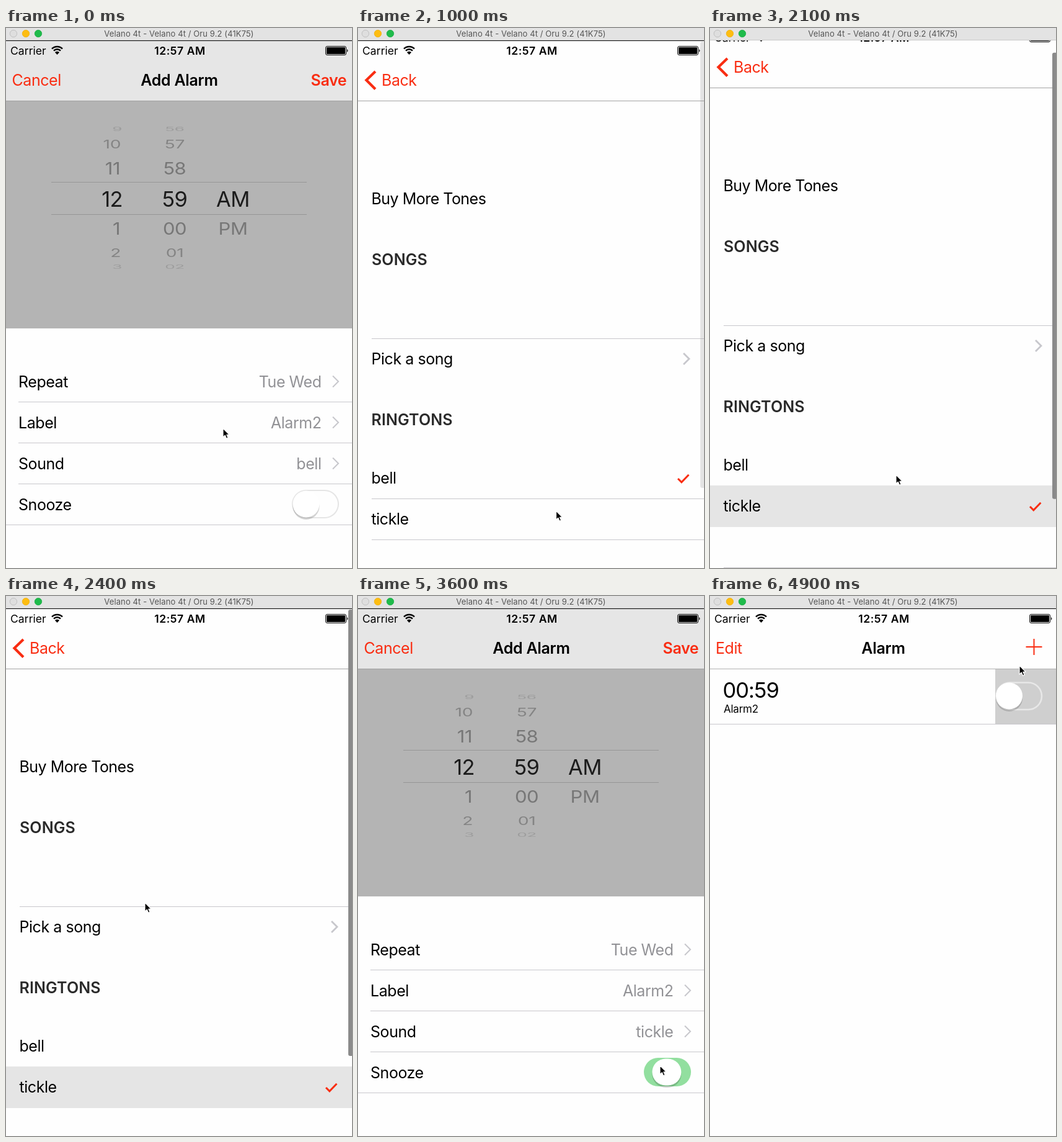
An HTML page that plays this animation: 558 by 870 pixels, repeating every 5 s.

```html
<!DOCTYPE html>
<html lang="en">
<head>
<meta charset="utf-8">
<title>Alarm settings</title>
<style>
  html, body { margin: 0; width: 100%; height: 100%; overflow: hidden; background: #fefefe; }
  svg { display: block; width: 100vw; height: 100vh; }
  text { font-family: Inter, Roboto, "Liberation Sans", sans-serif; white-space: pre; }
</style>
</head>
<body>
<svg id="stage" viewBox="0 0 558 870" xmlns="http://www.w3.org/2000/svg"></svg>
<script>
const RED = '#f92d12', GREY = '#929296', LINE = '#c8c7cc', LOOP = 5000, STEP = 100;

// ---- drawing helpers ----
const label = (x, y, str, o = {}) => {
  const { size = 25, weight = 400, fill = '#000', anchor = 'start', gap = -0.45, id = '' } = o;
  return `<text id="${id}" x="${x}" y="${y}" font-size="${size}" font-weight="${weight}" ` +
    `fill="${fill}" text-anchor="${anchor}" letter-spacing="${gap}">${str}</text>`;
};
const box = (x, y, w, h, fill, extra = '') =>
  `<rect x="${x}" y="${y}" width="${w}" height="${h}" fill="${fill}" ${extra}/>`;
const rule = (y, x = 0, w = 558, fill = LINE) => box(x, y, w, 1, fill);
const stroke = (d, color, width, extra = '') =>
  `<path d="${d}" fill="none" stroke="${color}" stroke-width="${width}" ${extra}/>`;
const group = (id, inner, extra = '') => `<g id="${id}" ${extra}>${inner}</g>`;
const arrow = (x, y, width) => stroke(`M${x} ${y - 9}l9 9l-9 9`, '#c7c7cc', width);
const middle = { weight: 600, anchor: 'middle', gap: -.3 };
const heading = { weight: 600, fill: '#2a2a2a', gap: .1 };

// ---- time picker: y centre, x scale, y scale, colour, hour, hour edge, minute, half ----
const dial = [
  [163, .76, .25, '#9d9d9d', '9', 187, '56', ''],
  [187, .82, .56, '#848484', '10', 185, '57', ''],
  [226, .90, .80, '#777', '11', 184, '58', ''],
  [275, 1, 1, '#1c1c1c', '12', 188, '59', 'AM'],
  [323, .90, .80, '#777', '1', 184, '00', 'PM'],
  [362, .82, .56, '#848484', '2', 185, '01', ''],
  [385, .76, .25, '#9d9d9d', '3', 187, '02', '']
];
const dialText = ([y, sx, sy, fill, hour, edge, minute, half]) => {
  const put = (x, str, anchor) => str &&
    `<g transform="translate(${x} ${y}) scale(${sx} ${sy})">` +
    label(0, 12.6, str, { size: 34.5, fill, anchor, gap: -.6 }) + '</g>';
  return put(edge, hour, 'end') + put(272, minute, 'middle') + put(366, half, 'middle');
};
const picker = box(-60, 118, 618, 366, '#b4b4b4') + rule(248, 73, 412, '#969696') +
  rule(300, 73, 412, '#969696') + dial.map(dialText).join('');

const row = (i, name, value, id) => {
  const y = 579 + 66 * i;
  return label(20, y, name) + (value ? label(508.5, y, value, { fill: GREY, anchor: 'end', id }) +
    arrow(527, y - 9.5, 2) + rule(y + 23, 20, 538) : rule(y + 23));
};

const knob = (id, x, y, r) => group(id,
  `<rect x="${x - r}" y="${y - r + 3.5}" width="${2 * r}" height="${2 * r}" rx="${r}" fill="#000" opacity=".17"/>` +
  `<rect x="${x - r}" y="${y - r}" width="${2 * r}" height="${2 * r}" rx="${r}" fill="#fff"/>`);

const snooze = box(461, 744, 76, 46, '#e5e5e5', 'rx="23" id="track"') +
  box(463, 746, 72, 42, '#fefefe', 'rx="21" id="hollow"') + knob('knob', 484, 767, 21.5);

const addPage = group('addPage', box(-60, 118, 618, 800, '#fefefe') + picker +
  row(0, 'Repeat', 'Tue Wed') + row(1, 'Label', 'Alarm2') + row(2, 'Sound', 'bell', 'tone') +
  row(3, 'Snooze') + snooze);

const soundPage = group('soundPage',
  box(-9, 118, 9, 800, 'url(#edge)') + box(0, 118, 558, 800, '#fefefe') +
  label(21.5, 284, 'Buy More Tones', { gap: -.52 }) +
  label(22, 382, 'SONGS', heading) + rule(500, 22, 536) +
  label(21.5, 542, 'Pick a song') + arrow(525, 533, 2.8) +
  label(21.5, 640, 'RINGTONS', heading) +
  rule(758, 22, 536) + rule(824, 22, 536) + rule(890, 22, 536) +
  box(0, 758, 558, 67, '#e5e5e5', 'id="picked"') +
  label(21.5, 734, 'bell') + label(21.5, 800, 'tickle') +
  stroke('M516 726l5.8 5.8l11.6-12', RED, 3, 'id="check"'));

const addNav = box(0, 21, 558, 97, '#e6e6e6') +
  group('white', box(-28, 21, 37, 97, 'url(#haze)') + box(8, 21, 640, 97, '#fefefe')) +
  group('addItems', label(9.5, 93, 'Cancel', { fill: RED }) +
    group('addTitle', label(279.5, 93, 'Add Alarm', middle)) +
    label(549, 93, 'Save', { weight: 600, fill: RED, anchor: 'end' })) +
  group('backItems', stroke('M28 70L13.5 84L28 98.5', RED, 4.2) + label(38, 93, 'Back', { fill: RED })) +
  rule(117, 0, 558, '#a3a3a3');

const listPage = box(0, 21, 558, 900, '#fefefe') +
  label(9, 93, 'Edit', { fill: RED }) + label(279.5, 93, 'Alarm', middle) +
  stroke('M509.5 82h26M522.5 69v26', RED, 2) + rule(117, 0, 558, '#b2b2b2') +
  label(20.5, 164, '00:59', { size: 34.5, gap: -1 }) +
  label(22, 188, 'Alarm2', { size: 17, gap: -.25 }) + rule(206) +
  box(460, 118, 98, 88, '#cfcfcf') +
  box(462, 139.5, 73, 43.5, 'none', 'rx="21.7" stroke="#e8e8e8" stroke-width="2.5"') +
  knob('', 482.5, 161, 21.5);

const arc = r => {
  const d = r * .72;
  return stroke(`M${82.5 - d} ${42 - d}A${r} ${r} 0 0 1 ${82.5 + d} ${42 - d}`, '#000', 2.5);
};
const status = rule(20, 0, 558, '#111') + label(7, 43, 'Carrier', { size: 17.6, gap: 0 }) +
  '<path d="M82.5 43l-3.5-3.8a5 5 0 0 1 7 0z"/>' + arc(7.6) + arc(11.8) +
  label(280.5, 43, '12:57 AM', { size: 17.6, weight: 600, anchor: 'middle', gap: .5 }) +
  box(515.5, 29.5, 33, 14, 'none', 'rx="2.5" stroke="#000"') + box(517, 31, 30, 11, '#000', 'rx="1"') +
  '<path d="M550 34a3 3 0 0 1 0 5z"/>';

const dot = (x, fill, edge) => `<circle cx="${x}" cy="9" r="5.7" fill="${fill}" stroke="${edge}" stroke-width=".8"/>`;
const titleBar = box(0, 0, 558, 20, '#e3e3e3') + rule(19, 0, 558, '#c9c9c9') +
  dot(12, '#dedede', '#b9b9b9') + dot(32, '#fdbd12', '#f0b00c') + dot(52, '#1fbb4b', '#18ac42') +
  label(279, 14, 'Velano 4t - Velano 4t / Oru 9.2 (41K75)',
    { size: 13, fill: '#555', anchor: 'middle', gap: .1 });

const fade = (id, color) => `<linearGradient id="${id}"><stop offset="0" stop-color="${color}" stop-opacity="0"/>` +
  `<stop offset="1" stop-color="${color}"/></linearGradient>`;

document.getElementById('stage').innerHTML =
  `<defs>${fade('edge', '#e6e6e6')}${fade('haze', '#fefefe')}</defs>` +
  box(0, 0, 558, 870, '#fefefe') +
  group('screen', listPage + group('modal', addPage + soundPage + addNav) + status) +
  box(552, 22, 8, 719, '#8a8a8a', 'rx="3" id="bar"') + titleBar +
  group('cursor', '<path d="M0 0V14.2L3.3 11.2L5.6 16.4L8.1 15.3L5.9 10.3H10.2Z" ' +
    'stroke="#fff" stroke-width="1.2" stroke-linejoin="round"/>');

// ---- motion ----
const cursorPath = [
  [0, 350, 645], [100, 349, 652], [200, 343, 690], [300, 340, 702], [400, 340, 702],
  [800, 322, 770], [1000, 319.5, 778], [1800, 318, 778], [1900, 318, 778], [2100, 300, 720],
  [2400, 224, 494], [2500, 130, 240], [2600, 68, 98], [2900, 66, 99], [3000, 75, 112],
  [3300, 360, 600], [3500, 486, 756], [3700, 488, 757], [3900, 500, 560], [4100, 513, 170],
  [4200, 514, 92], [4800, 514, 92], [4900, 499, 112]
];
const scrollPath = [[1000, 0], [1200, 18], [1300, 25], [2000, 25], [2100, 21], [2200, 8], [2300, 0]];
const barPath = [[900, 0], [1000, .22], [1100, .9], [1200, 1], [2400, 1], [2500, .7], [2700, 0]];
const snoozePath = [[3500, 0], [3600, .4], [3700, .85], [3800, 1]];
const dropPath = [[4200, 0], [4300, 342], [4400, 900]];
const PUSH = 440, POP = 2640, PICK = 1600;

const clamp = v => Math.max(0, Math.min(1, v));
const mix = (a, b, k) => a + (b - a) * k;

function along(path, t, col = 1) {
  const i = path.findIndex(p => p[0] > t);
  if (i === 0) return path[0][col];
  if (i < 0) return path[path.length - 1][col];
  const a = path[i - 1], b = path[i];
  return mix(a[col], b[col], (t - a[0]) / (b[0] - a[0]));
}

// critically damped spring, as used by page transitions
function spring(ms) {
  const w = 18.3 * Math.max(0, ms) / 1000;
  return ms > 500 ? 1 : 1 - (1 + w) * Math.exp(-w);
}

const el = id => document.getElementById(id);
const set = (id, name, value) => el(id).setAttribute(name, value);
const move = (id, x, y = 0) => set(id, 'transform', `translate(${x} ${y})`);

function drawSwitch(p) {
  const k = clamp(p * 1.35), on = [76, 217, 100];
  set('track', 'fill', `rgb(${on.map(c => Math.round(mix(229, c, k)))})`);
  const s = clamp(1 - p * 3);
  set('hollow', 'transform', `translate(499 767) scale(${s}) translate(-499 -767)`);
  const width = 43 + 4 * Math.sin(Math.PI * p);
  move('knob', 30 * p);
  for (const part of el('knob').children) part.setAttribute('width', width);
}

function draw(t) {
  const scroll = along(scrollPath, t);
  move('screen', 0, -scroll);
  move('bar', 0, scroll * .845);
  set('bar', 'opacity', along(barPath, t));

  const popping = t >= POP;
  const shown = popping ? 1 - spring(t - POP) : spring(t - PUSH);
  const q = popping ? 1 - clamp((t - POP) / 500) : clamp((t - PUSH) / 500);
  const x = 558 * (1 - shown), visible = shown > .005 ? 'visible' : 'hidden';
  move('soundPage', x);
  move('white', x - 36 * shown);
  set('soundPage', 'visibility', visible);
  set('white', 'visibility', visible);
  move('addPage', -167 * shown);
  move('addTitle', -167 * shown);
  set('addItems', 'opacity', Math.pow(1 - q, 1.5));
  set('backItems', 'opacity', clamp(2 * q - 1));

  const picked = t >= PICK;
  set('picked', 'visibility', picked ? 'inherit' : 'hidden');
  move('check', 0, picked ? 66 : 0);
  el('tone').textContent = picked ? 'tickle' : 'bell';

  drawSwitch(along(snoozePath, t));
  move('modal', 0, along(dropPath, t));
  move('cursor', along(cursorPath, t), along(cursorPath, t, 2));
}

const start = performance.now();
function tick() {
  const t = (performance.now() - start) % LOOP;
  draw(Math.floor(t / STEP) * STEP);
  requestAnimationFrame(tick);
}
tick();
</script>
</body>
</html>
```
